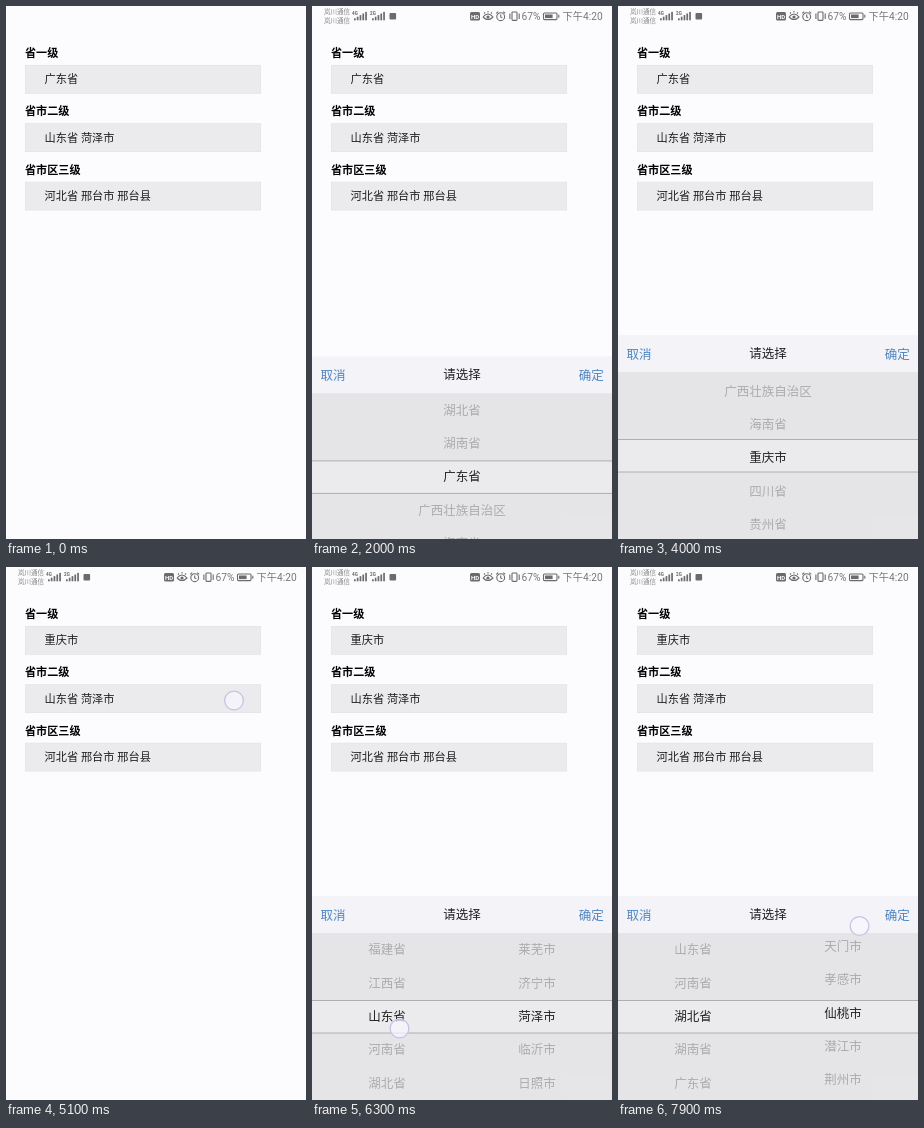
Animation of 300x533 px, one loop 8000 ms. Source, as an HTML page:

```html
<!DOCTYPE html>
<html lang="zh-CN">
<head>
<meta charset="utf-8">
<title>省市区选择</title>
<style>
html, body { margin: 0; width: 100%; height: 100%; overflow: hidden; background: #fcfbfe; }
svg { display: block; width: 100vw; height: 100vh; }
text { font-family: Roboto, "Noto Sans CJK SC", "Noto Sans CJK", sans-serif; dominant-baseline: alphabetic; }
.label { font-size: 11.1px; font-weight: 700; fill: #000; }
.value { font-size: 11.2px; fill: #1c1c1e; }
.box { fill: #ebeaec; stroke: #e2e1e5; stroke-width: .7; }
.row, .head { font-size: 12.5px; fill: #222; text-anchor: middle; }
.action { font-size: 12.5px; fill: #4b86c6; }
.mask { fill: #e6e5e8; fill-opacity: .7; }
.rule { stroke: #aaa9ad; stroke-width: .9; }
.carrier { font-size: 6.5px; fill: #858589; }
.net { font-size: 4.6px; font-weight: 700; fill: #666; }
.clock { font-size: 10.2px; fill: #77777b; }
.icon { fill: none; stroke: #6b6b6f; stroke-width: 1.1; }
.solid { fill: #6b6b6f; }
</style>
</head>
<body>
<svg viewBox="0 0 300 533" preserveAspectRatio="none">
  <defs><clipPath id="window"><rect y="366" width="300" height="167"/></clipPath></defs>
  <rect width="300" height="533" fill="#fcfbfe"/>

  <g id="status">
    <text class="carrier" x="12" y="8.3">岚川通信</text>
    <text class="carrier" x="12" y="17.3">岚川通信</text>
    <g id="signals"></g>
    <rect class="solid" x="77.5" y="7" width="6.6" height="6.4" rx="1"/>
    <rect class="solid" x="158" y="6" width="10" height="8.4" rx="1.5"/>
    <text x="163" y="12.6" font-size="6" font-weight="700" fill="#fff" text-anchor="middle">HD</text>
    <path class="icon" d="M171 11q5-6 10 0q-5 5-10 0M173 7.5l-1-1M176 6.5v-1.5M179 7.5l1-1"/>
    <circle class="solid" cx="176" cy="11" r="1.6"/>
    <circle class="icon" cx="188.7" cy="10.7" r="3.9"/>
    <path class="icon" d="M188.7 8.5v2.4l1.6 1M184.2 7.4l2-1.8M193.2 7.4l-2-1.8"/>
    <rect class="icon" x="200" y="6" width="5" height="8.4" rx=".8"/>
    <path class="icon" d="M197.9 7.5v5.5M207.2 7.5v5.5"/>
    <text class="clock" x="209.5" y="13.8">67%</text>
    <rect class="icon" x="231.5" y="7" width="13.5" height="6.6" rx="1"/>
    <rect class="solid" x="233" y="8.5" width="7.6" height="3.6"/>
    <path class="icon" d="M246.8 8.8v3"/>
    <text class="clock" x="250.6" y="13.9">下午4:20</text>
  </g>

  <g id="form"></g>

  <g id="sheet">
    <rect y="329" width="300" height="37.5" fill="#f4f3f7"/>
    <rect y="366" width="300" height="168" fill="#e6e5e8"/>
    <rect y="433.5" width="300" height="32.5" fill="#ebeaed"/>
    <text class="head" x="150" y="351.5">请选择</text>
    <text class="action" x="8.5" y="352.8">取消</text>
    <text class="action" x="266.7" y="352.8">确定</text>
    <g id="columns" clip-path="url(#window)"></g>
    <rect class="mask" y="366" width="300" height="67.5"/>
    <rect class="mask" y="466" width="300" height="67"/>
    <path class="rule" d="M0 433.5H300M0 466H300"/>
  </g>

  <circle id="touch" r="9.4" fill="#f8f6fd" fill-opacity=".7" stroke="#c6c2e6" stroke-width="1.3"/>
</svg>
<script>
const LOOP = 8000, STEP = 100, PITCH = 33.3, MIDDLE = 454;
const $ = id => document.getElementById(id);

function add(parent, tag, attrs, text = '') {
  const node = document.createElementNS('http://www.w3.org/2000/svg', tag);
  for (const key in attrs) node.setAttribute(key, attrs[key]);
  node.textContent = text;
  return parent.appendChild(node);
}

const provinces = ('浙江省 安徽省 福建省 江西省 山东省 河南省 湖北省 湖南省 广东省 ' +
  '广西壮族自治区 海南省 重庆市 四川省 贵州省 云南省 西藏自治区').split(' ');
const shandong = '泰安市 莱芜市 济宁市 菏泽市 临沂市 日照市 威海市'.split(' ');
const hubei = '武汉市 黄冈市 天门市 孝感市 仙桃市 潜江市 荆州市 宜昌市'.split(' ');

function column(x, names) {
  const group = add($('columns'), 'g', {});
  names.forEach((name, i) => add(group, 'text', { class: 'row', x, y: MIDDLE + i * PITCH }, name));
  return group;
}

const single = column(150, provinces);
const left = column(75, provinces);
const rightA = column(225, shandong);
const rightB = column(225, hubei);

const fields = [['省一级', '广东省'], ['省市二级', '山东省 菏泽市'], ['省市区三级', '河北省 邢台市 邢台县']]
  .map(([label, value], i) => {
    const y = 58.4 * i;
    add($('form'), 'text', { class: 'label', x: 19, y: y + 51 }, label);
    add($('form'), 'rect', { class: 'box', x: 19.3, y: y + 59.3, width: 235.4, height: 28 });
    return add($('form'), 'text', { class: 'value', x: 38.6, y: y + 77.4 }, value);
  });

[[40, '4G'], [58, '2G']].forEach(([x, name]) => {
  add($('signals'), 'text', { class: 'net', x, y: 9 }, name);
  for (let i = 0; i < 5; i++) {
    const height = 2 + i * 1.6;
    add($('signals'), 'rect', { class: 'solid', x: x + 2 + i * 2.8, y: 14.3 - height, width: 1.7, height });
  }
});

// Eased value through [time, value] points.
function track(t, points) {
  let [t0, v0] = points[0];
  for (const [t1, v1] of points) {
    if (t < t1) {
      const p = Math.max(0, (t - t0) / (t1 - t0));
      return v0 + (v1 - v0) * p * p * (3 - 2 * p);
    }
    [t0, v0] = [t1, v1];
  }
  return v0;
}

// start, end, x, first y, last y
const touches = [
  [1500, 1700, 200.5, 74.5, 74.5],
  [2700, 3100, 159.5, 452.5, 395],
  [3500, 3800, 159.5, 462, 431],
  [4400, 4600, 279, 348, 348],
  [5100, 5300, 228, 133.5, 133.5],
  [6300, 6800, 87.5, 461.5, 402],
  [7200, 8000, 241.5, 492, 359]
];

function show(node, on) { node.setAttribute('visibility', on ? 'inherit' : 'hidden'); }
function shift(node, y) { node.setAttribute('transform', `translate(0 ${y})`); }

function draw(t) {
  $('status').setAttribute('opacity', track(t, [[300, 0], [700, 1]]));
  fields[0].textContent = t < 4500 ? '广东省' : '重庆市';

  const drop = track(t, [[1600, 206], [2100, 0], [4400, 0], [4700, 206], [5200, 206], [5600, 0]]);
  shift($('sheet'), drop);
  show($('sheet'), drop < 206);

  const second = t >= 4900;
  show(single, !second);
  show(left, second);
  show(rightA, second && t < 7000);
  show(rightB, t >= 7000);

  shift(single, -PITCH * track(t, [[2700, 8], [3300, 10], [3500, 10], [4100, 11]]));
  shift(left, -PITCH * track(t, [[6300, 4], [7000, 6]]));
  shift(rightA, -PITCH * 3);
  shift(rightB, -PITCH * track(t, [[7200, 0], [7900, 4.1]]));

  const touch = touches.find(([start, end]) => t >= start && t < end);
  show($('touch'), touch);
  if (touch) {
    const [start, end, x, y0, y1] = touch;
    $('touch').setAttribute('cx', x);
    $('touch').setAttribute('cy', track(t, [[start, y0], [end - STEP, y1]]));
  }
}

const began = performance.now();
function tick() {
  const t = (performance.now() - began) % LOOP;
  draw(Math.floor(t / STEP) * STEP);
  requestAnimationFrame(tick);
}
tick();
</script>
</body>
</html>
```
